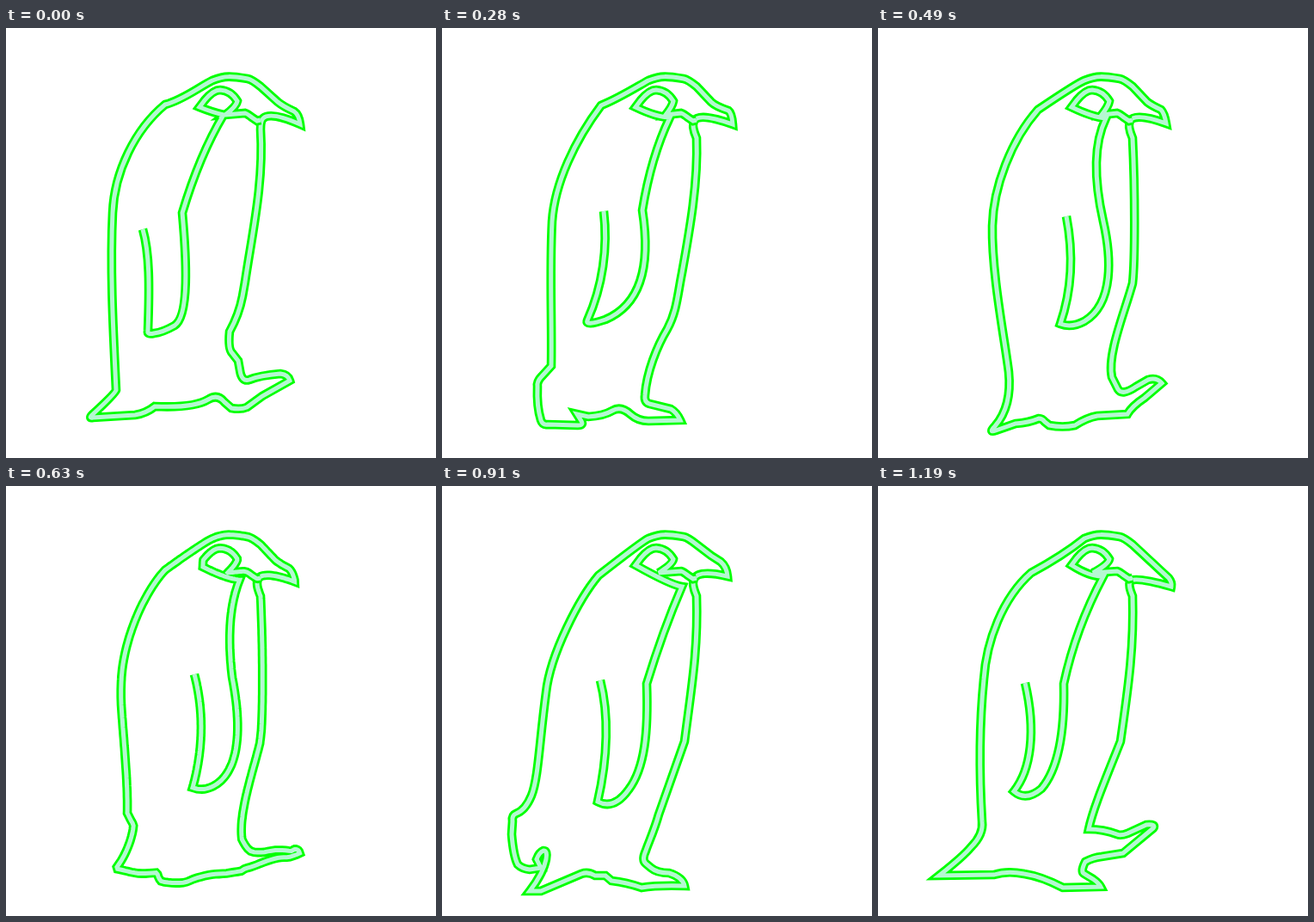
An HTML page that plays this animation: 500 px wide and 500 px high, repeating every 1260 ms.

```html
<!DOCTYPE html>
<html lang="en">
<head>
<meta charset="utf-8">
<title>Walking penguin</title>
<style>
  html, body { margin: 0; width: 100%; height: 100%; overflow: hidden; background: #fff; }
  svg { display: block; width: 100vw; height: 100vh; }
  path { fill: none; stroke-miterlimit: 4; }
  .edge { stroke: #00ff00; stroke-width: 10.6; }
  .core { stroke: #b5f8d2; stroke-width: 5; }
</style>
</head>
<body>
<svg viewBox="0 0 500 500">
  <path class="edge body"/><path class="core body"/>
  <path class="edge wing"/><path class="core wing"/>
</svg>
<script>
const STEP = 70, COUNT = 18;

// Crown of the head, from the brow to the nape.
const crown = nape => `L296,68 Q286,60 281,59 C262,56 255,55 240,61 ${nape}`;
const openMouth = 'Q290,114 293,108';

// Eye outline and mouth line; dip shapes the lower lid, x is where the mouth begins.
const eye = (dip, x) => `Q${dip} 225,92 L231,84 Q241,72 249,72 Q262,73 269,85 ` +
  `Q268,91 ${x},101 L278,99 Q281,100 286,104 L292,108 L296,107`;

// body parts: head, back, feet, belly; wing parts: down, up, eye
const poses = [
  { at: 0,
    chin: '296,118',
    body: [
      'Q296,108 299,105 Q308,97 342,112 C341,104 338,99 335,97 Q322,91 316,86 ' + crown('C224,69 205,84 185,89'),
      'C150,118 126,167 124,215 C121,275 124,340 128,421',
      'Q127,425 100,450 Q96,454 101,453 L150,450 Q163,448 173,440 C195,441 222,440 235,432 Q246,425 254,435 L262,442 Q273,444 280,441 L298,428 L330,410 Q328,403 319,402 Q295,404 283,409 Q274,412 272,398 L270,387',
      'L263,378 Q258,373 260,353 Q271,333 275,312 L278,295 C286,240 300,180 296,118'],
    tip: '159,234',
    wing: ['C167,262 167,300 165,352', 'Q164,357 172,355 Q182,354 196,346 C213,335 210,270 205,215 Q225,148 253,101', eye('240,98', 255)] },
  { at: 2,
    chin: '296,118',
    body: [
      'Q296,108 299,104 Q309,97 339,112 Q338,99 334,96 Q320,91 313,86 ' + crown('C224,69 205,84 185,89'),
      'C150,118 126,167 124,215 C121,275 124,340 128,421',
      'Q127,425 105,446 L143,443 Q155,439 175,440 C200,441 222,440 235,432 Q246,425 254,436 Q262,442 272,440 L308,440 Q303,429 296,427 L281,424 Q267,422 264,414 Q255,390 258,362',
      'Q259,353 264,345 Q273,325 278,295 C286,240 300,180 296,118'],
    tip: '159,234',
    wing: ['C165,262 158,310 149,345', 'Q147,352 165,346 C188,340 195,275 200,215 Q207,157 252,101', eye('240,98', 255)] },
  { at: 4,
    chin: '296,128',
    body: [
      openMouth + ' Q299,98 338,112 Q337,99 333,96 Q318,91 313,86 ' + crown('C224,70 205,82 185,90'),
      'C155,130 131,180 128,225 C125,285 128,340 127,393',
      'L116,405 Q110,411 111,417 Q110,440 115,456 Q117,462 123,461 L158,462 Q165,462 162,457 L157,449 L170,452 Q188,451 198,445 Q208,439 219,449 Q228,457 240,457 L277,456 Q273,447 266,443 L241,437 Q235,435 236,427',
      'C238,400 250,370 262,350 C273,330 274,310 279,285 C288,235 298,180 296,128'],
    tip: '188,213',
    wing: ['C193,255 187,300 169,340', 'Q166,347 190,339 C235,320 242,270 233,212 Q243,150 265,104', eye('250,104', 260)] },
  { at: 7,
    chin: '296,128',
    body: [
      openMouth + ' Q299,98 335,111 Q333,99 329,95 Q318,90 313,86 ' + crown('Q232,64 186,95'),
      'C155,130 134,185 133,230 C132,285 147,360 152,400',
      'Q156,440 136,463 Q128,471 137,468 L160,460 Q175,459 187,454 Q191,454 194,458 L199,462 Q215,465 229,462 Q243,453 255,451 L290,449 Q295,440 310,430 L330,413 Q324,406 314,409 L300,417 Q284,428 279,420 L272,406',
      'C266,380 287,330 296,297 C299,270 299,190 296,128'],
    tip: '219,219',
    wing: ['C226,255 227,300 212,344', 'Q225,349 240,341 C275,320 271,265 262,225 C253,185 248,140 265,105', eye('250,104', 260)] },
  { at: 11,
    chin: '296,128',
    body: [
      openMouth + ' Q300,98 338,112 Q334,100 328,97 Q318,91 313,86 ' + crown('Q222,71 183,103'),
      'C160,125 134,195 134,235 Q137,300 119,341',
      'Q130,345 136,342 Q142,338 139,348 C130,375 115,400 111,425 Q112,431 125,436 L138,441 L126,452 Q124,455 130,456 Q155,461 165,457 Q180,457 188,453 L203,452 L226,443 Q232,449 244,449 Q268,449 272,455 Q277,460 279,464 Q300,461 330,461 Q327,452 315,447 L302,445 L285,435 Q279,430 279,420',
      'C279,370 287,340 296,290 C299,270 299,190 296,128'],
    tip: '219,219',
    wing: ['C236,262 237,310 227,364', 'Q245,371 259,353 C273,335 274,290 268,230 Q272,170 285,117', eye('268,116', 252)] },
  { at: 13,
    chin: '296,128',
    body: [
      openMouth + ' Q298,97 332,105 Q331,94 324,88 L313,81 ' + crown('Q232,65 182,104'),
      'C160,130 126,195 121,240 C113,300 112,340 104,360',
      'Q97,377 86,381 Q81,383 82,390 L81,405 Q83,430 88,440 Q93,445 102,446 L115,444 L110,434 Q113,426 118,424 Q123,424 121,434 Q118,450 102,471 L115,471 Q150,456 162,451 Q170,448 178,453 L190,453 L197,459 Q215,461 232,467 Q250,464 282,465 Q280,455 264,450 Q250,450 243,444 L237,439 Q232,435 237,424',
      'C240,415 247,400 252,382 L282,297 C290,235 298,190 296,128'],
    tip: '184,226',
    wing: ['C194,265 193,315 181,367', 'Q200,377 217,353 C236,328 240,285 238,230 Q257,168 279,117', eye('266,115', 252)] },
  { at: 17,
    chin: '296,128',
    body: [
      'Q290,114 294,110 Q302,106 341,117 Q342,112 338,107 ' + crown('Q215,81 178,101'),
      'C145,130 126,180 123,225 C117,285 118,340 121,390',
      'Q123,405 108,420 Q100,430 71,453 L135,452 Q150,447 170,451 Q190,454 215,467 L259,466 Q257,462 250,457 L240,451 Q235,449 241,437 Q250,432 260,431 L285,427 L320,398 Q324,393 312,394 L290,404 Q282,407 278,405 Q262,399 245,399',
      'C250,375 265,340 282,297 C290,240 298,190 296,128'],
    tip: '171,229',
    wing: ['C184,285 178,330 158,355', 'Q172,367 190,352 C213,325 217,275 216,230 Q230,165 262,105', eye('247,106', 250)] }
];

// The stride at its longest, just after the foot lifts.
const lift = poses[3];
const [head, back, , belly] = lift.body;
const reach = 'Q156,440 136,465 Q128,473 137,469 L165,460 Q180,459 192,454 Q197,454 200,458 L206,462 ' +
  'Q222,465 236,462 Q250,453 262,451 L300,449 Q325,428 366,410 Q360,402 345,403 L305,414 Q286,424 280,416 L272,406';
poses.splice(4, 0, { ...lift, at: 8, body: [head, back, reach, belly] });

const probe = document.createElementNS('http://www.w3.org/2000/svg', 'path');

// Evenly spaced points along each part of a line.
function sample(start, parts) {
  return parts.map(part => {
    probe.setAttribute('d', `M${start} ${part}`);
    start = part.split(' ').pop().replace(/^[A-Z]/, '');
    const size = probe.getTotalLength();
    return Array.from({ length: 101 }, (_, i) => probe.getPointAtLength(size * i / 100));
  }).flat();
}

for (const p of poses) {
  p.bodyPts = sample(p.chin, p.body);
  p.wingPts = sample(p.tip, p.wing);
}

const blend = (a, b, k) => 'M' + a.map((p, i) =>
  `${(p.x + (b[i].x - p.x) * k).toFixed(1)},${(p.y + (b[i].y - p.y) * k).toFixed(1)}`).join('L');

function build(n) {
  const i = poses.findLastIndex(p => p.at <= n);
  const a = poses[i], b = poses[i + 1];
  if (a.at === n) {
    return { body: `M${a.chin} ${a.body.join(' ')}Z`, wing: `M${a.tip} ${a.wing.join(' ')}` };
  }
  const k = (n - a.at) / (b.at - a.at);
  return { body: blend(a.bodyPts, b.bodyPts, k) + 'Z', wing: blend(a.wingPts, b.wingPts, k) };
}

const steps = Array.from({ length: COUNT }, (_, n) => build(n));
const start = performance.now();

function draw(now) {
  const n = Math.floor(Math.max(0, now - start) / STEP) % COUNT;
  for (const name of ['body', 'wing'])
    document.querySelectorAll('.' + name).forEach(el => el.setAttribute('d', steps[n][name]));
  requestAnimationFrame(draw);
}
draw(start);
</script>
</body>
</html>
```
